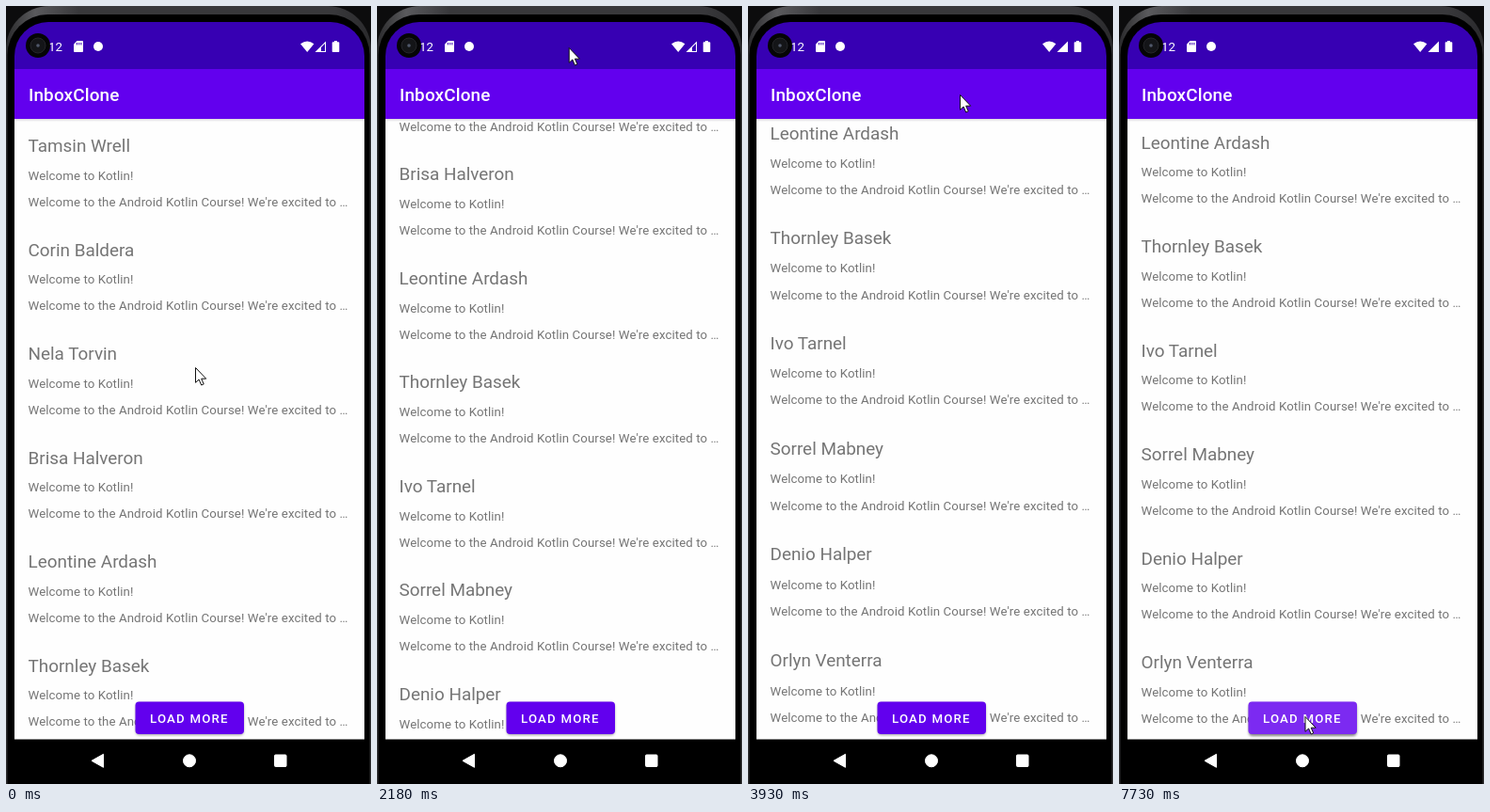
Recreate the animation shown at these times as an HTML page. Size 388x827 px, loop 8000 ms.

```html
<!DOCTYPE html>
<html lang="en">
<head>
<meta charset="utf-8">
<title>Mail list</title>
<style>
  html, body { margin: 0; width: 100%; height: 100%; overflow: hidden; background: #000; }
  svg { display: block; width: 388px; height: 827px; font-family: Roboto, sans-serif; }
  .name { font-size: 18.9px; }
  .line { font-size: 13.24px; letter-spacing: .09px; }
  .list { fill: #757575; }
  .title { font-size: 18.9px; font-weight: 500; letter-spacing: .0075em; fill: #fff; }
  .label { font-size: 13.24px; font-weight: 500; letter-spacing: .0893em; fill: #fff; }
</style>
</head>
<body>
<svg viewBox="0 0 388 827">
  <defs>
    <clipPath id="screen"><rect x="9" y="17" width="372" height="900" rx="36"/></clipPath>
    <clipPath id="view"><rect x="9" y="120" width="372" height="660"/></clipPath>
    <clipPath id="pill"><rect x="137.5" y="739.5" width="115.500" height="34.500" rx="4"/></clipPath>
    <linearGradient id="shade" x2="0" y2="1">
      <stop stop-color="#000" stop-opacity=".14"/>
      <stop offset="1" stop-color="#000" stop-opacity="0"/>
    </linearGradient>
    <linearGradient id="rim">
      <stop stop-color="#2a2a2c"/>
      <stop offset=".08" stop-color="#5a5a5d"/>
      <stop offset=".2" stop-color="#38383b"/>
      <stop offset=".9" stop-color="#38383b"/>
      <stop offset="1" stop-color="#2a2a2c"/>
    </linearGradient>
    <filter id="blur" x="-20%" y="-40%" width="140%" height="180%"><feGaussianBlur stdDeviation="1.5"/></filter>
  </defs>

  <!-- phone body -->
  <rect width="388" height="827" fill="#0c0c0d"/>
  <rect width="388" height="900" rx="46" fill="url(#rim)"/>
  <rect x="1.5" y="9" width="385" height="900" rx="43" fill="#000"/>

  <g clip-path="url(#screen)">
    <rect x="9" y="17" width="372" height="50" fill="#3700b3"/>
    <rect x="9" y="120" width="372" height="660" fill="#fefefe"/>
    <g clip-path="url(#view)"><g id="list" class="list"></g></g>
    <rect x="9" y="120" width="372" height="3" fill="url(#shade)"/>
    <rect x="9" y="67" width="372" height="53" fill="#6200ee"/>
    <text class="title" x="24" y="101">InboxClone</text>
    <rect x="9" y="779.500" width="372" height="48" fill="#000"/>
  </g>

  <!-- status bar -->
  <g fill="#fff">
    <text x="45" y="48" font-size="13.3">12</text>
    <path d="M75.5 37H81q1 0 1 1V48q0 1-1 1H73q-1 0-1-1V40.5Z"/>
    <path d="M75.5 39v2.4M77.7 39v2.4M79.9 39v2.4" stroke="#3700b3"/>
    <circle cx="98" cy="43" r="5"/>
    <path d="M320.2 49L313 40.3Q320.2 34.5 327.4 40.3Z"/>
    <path id="weak" d="M340 37.5V49H328.5ZM339 40V48H335V44Z" fill-rule="evenodd"/>
    <path id="strong" d="M340 37.5V49H328.5Z"/>
    <path d="M349 37h3v1.200h1.500q.8 0 .8.800V48.200q0 .8-.8.800h-6q-.8 0-.8-.800V39q0-.8.800-.800H349Z"/>
  </g>
  <circle cx="34" cy="42" r="13" fill="#050506"/>
  <circle cx="34" cy="42" r="8" fill="#141518" stroke="#25262a"/>
  <circle cx="34" cy="42" r="1.800" fill="#50586a"/>

  <!-- navigation bar -->
  <g fill="#fff" stroke="#fff" stroke-linejoin="round">
    <path d="M91 802.300L103.500 795.300V809.300Z"/>
    <circle cx="195" cy="802.300" r="6.500"/>
    <rect x="285.500" y="796" width="12.500" height="12.500" rx="1"/>
  </g>

  <!-- button -->
  <g clip-path="url(#view)">
    <rect id="shadow" x="138" width="114.500" height="34" rx="4" filter="url(#blur)"/>
  </g>
  <g clip-path="url(#pill)">
    <rect x="137" y="739" width="117" height="36" fill="#6200ee"/>
    <rect id="tint" x="137" y="739" width="117" height="36" fill="#fff"/>
    <circle id="ripple" cx="198" cy="756" fill="#fff"/>
  </g>
  <text class="label" x="153" y="762">LOAD MORE</text>

  <path id="cursor" d="M.5.5V16.300L4.100 13 6.700 19 9.200 17.900 6.700 12.200H11.700Z"
        fill="#fff" stroke="#111" stroke-linejoin="round"/>
</svg>

<script>
const LOOP = 8000, STEP = 130;
const PITCH = 110.5, BOTTOM = 779, END = 445.3, SLOP = 7;
const PRESS = 7460;

// The screen refreshes every STEP ms, counted from the start of each action
const ACTIONS = [0, 810, 1910, 3450, 5740, PRESS];

// Pointer: start, end, x, y
const HOME = [201, 384];
const MOVES = [
  [780, 1460, 208, 166],   // first drag
  [1850, 1910, 200, 141],
  [1910, 2300, 205, 10],   // second drag, let go with a fling
  [2300, 2430, 207, 82],
  [2430, 2560, 182, 269],
  [2560, 2950, 162, 413],
  [3380, 3840, 225, 94],   // third drag, past the end
  [4490, 4620, 228, 259],
  [4620, 4880, 230, 471],
  [4880, 5140, 243, 643],
  [5140, 5400, 232, 706],
  [5660, 6000, 198, 764],
  [6150, 6520, 197.5, 755],
];

const NAMES = ["Tamsin Wrell", "Corin Baldera", "Nela Torvin", "Brisa Halveron",
  "Leontine Ardash", "Thornley Basek", "Ivo Tarnel", "Sorrel Mabney",
  "Denio Halper", "Orlyn Venterra"];

const $ = id => document.getElementById(id);
const set = (id, attrs) => {
  for (const key in attrs) $(id).setAttribute(key, attrs[key]);
};
const progress = (t, from, to) => Math.min(1, Math.max(0, (t - from) / (to - from)));
const smooth = u => u * u * (3 - 2 * u);

function pointer(t) {
  let [x, y] = HOME;
  for (const [from, to, toX, toY] of MOVES) {
    const k = smooth(progress(t, from, to));
    x += (toX - x) * k;
    y += (toY - y) * k;
  }
  return [x, y];
}

// Distance the list is dragged between two moments
function drag(t, from, to) {
  if (t <= from) return 0;
  return Math.max(0, pointer(from)[1] - pointer(Math.min(t, to))[1] - SLOP);
}

function scrolled(t) {
  const fling = 68 * (1 - (1 - progress(t, 2300, 2560)) ** 1.5);
  return drag(t, 780, 1460) + drag(t, 1910, 2300) + fling + drag(t, 3380, 3840);
}

const lines = [];
function addLine(cls, text, y) {
  const el = document.createElementNS("http://www.w3.org/2000/svg", "text");
  el.setAttribute("class", cls);
  el.setAttribute("x", 23.5);
  el.textContent = text;
  $("list").append(el);
  lines.push({ el, y });
}
NAMES.forEach((name, i) => {
  const top = i * PITCH;
  addLine("name", name, top + 155);
  addLine("line", "Welcome to Kotlin!", top + 184.7);
  addLine("line", "Welcome to the Android Kotlin Course! We're excited to …", top + 212.7);
});

// Overscroll pulls lines up, more the farther they are from the bottom edge
const pull = y => 12.5 * (1 - Math.exp(-Math.max(0, BOTTOM - y) / 430));

function draw(t) {
  const raw = scrolled(t), scroll = Math.min(raw, END);
  const release = (1 - progress(t, 3970, 4620)) ** 1.5;
  const stretch = (raw - scroll) / 270 * release;
  for (const line of lines) {
    const y = line.y - scroll;
    line.el.setAttribute("y", (y - stretch * pull(y)).toFixed(2));
  }
  set("cursor", { transform: `translate(${pointer(t)})` });

  const full = t >= 3690;
  set("strong", { opacity: full ? 1 : 0 });
  set("weak", { opacity: full ? 0 : 1 });

  const lift = t >= PRESS ? 1 : 0;
  const spread = progress(t, PRESS, PRESS + 2 * STEP);
  set("shadow", { y: 741 + lift, opacity: .38 + .12 * lift });
  set("tint", { opacity: .12 * spread });
  set("ripple", { opacity: .05 * spread, r: 66 * spread });
}

let shown = -1;
function run() {
  const t = performance.now() % LOOP;
  const start = ACTIONS.filter(v => v <= t).pop();
  const tick = start + Math.floor((t - start) / STEP) * STEP;
  if (tick !== shown) draw(shown = tick);
  requestAnimationFrame(run);
}
run();
</script>
</body>
</html>
```
